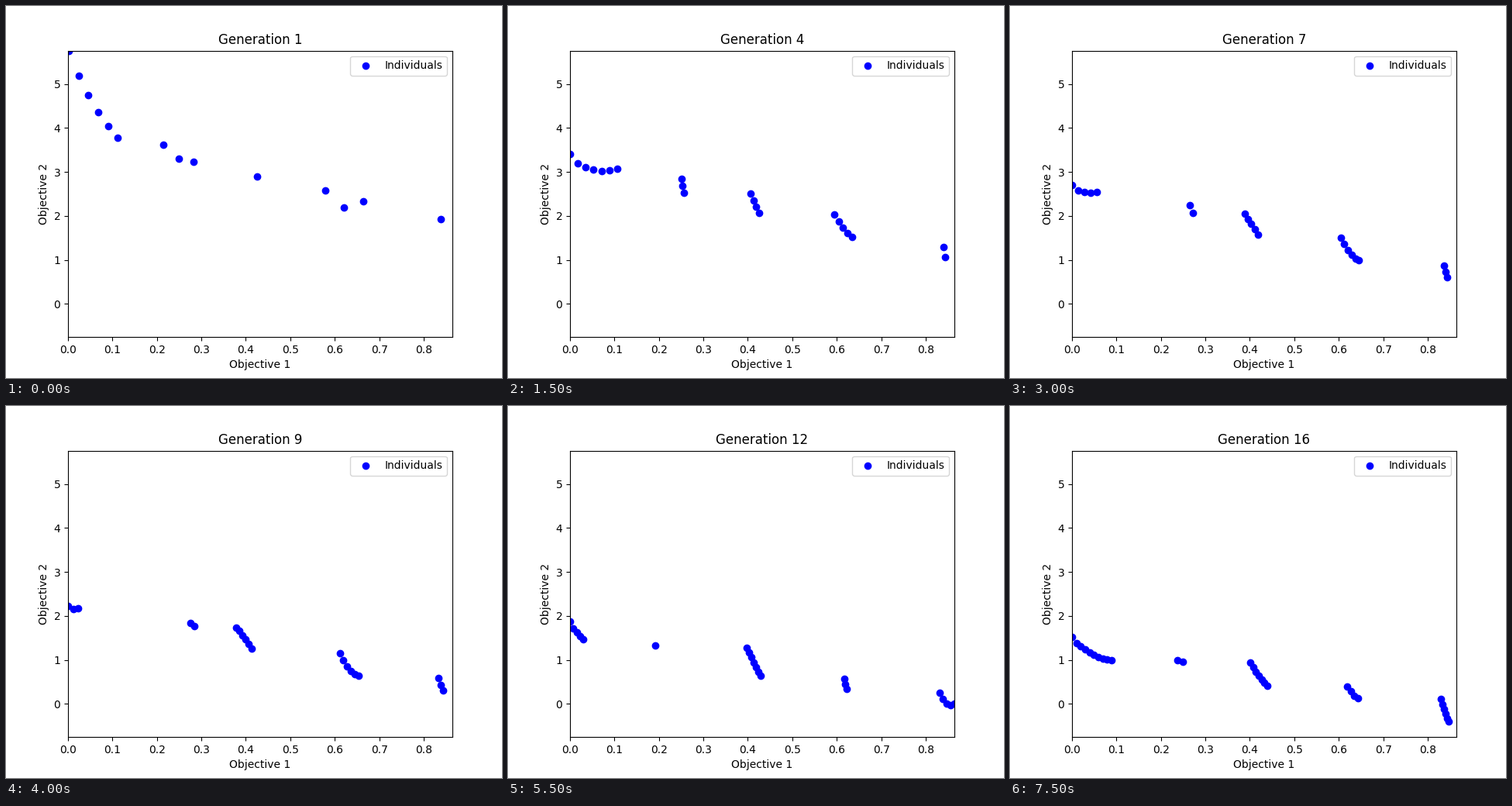
A matplotlib script that plays this animation: 640 px wide and 480 px high, repeating every 8 s.

```python
import numpy as np
import matplotlib.pyplot as plt
from matplotlib.animation import FuncAnimation

GENERATIONS = 16
XLIM, YLIM = (0, .8646), (-.755, 5.76)
PIXELS = np.array([496 / np.ptp(XLIM), 369.6 / np.ptp(YLIM)])

# Ends (x0, y0, x1, y1) of the five branches at a few generations
KEYS = {
    1: [(.002, 5.75, .112, 3.78), (.215, 3.62, .282, 3.23),
        (.425, 2.90, .425, 2.90), (.578, 2.58, .664, 2.33),
        (.838, 1.93, .838, 1.93)],
    4: [(0, 3.41, .106, 3.07), (.251, 2.84, .256, 2.53),
        (.406, 2.51, .425, 2.07), (.594, 2.03, .634, 1.52),
        (.841, 1.29, .843, 1.06)],
    9: [(0, 2.23, .023, 2.18), (.275, 1.84, .284, 1.77),
        (.378, 1.74, .413, 1.26), (.611, 1.15, .653, .64),
        (.833, .59, .843, .30)],
    12: [(0, 1.87, .03, 1.47), (.192, 1.33, .192, 1.33),
         (.397, 1.28, .429, .64), (.617, .57, .622, .34),
         (.831, .25, .864, 0)],
    16: [(0, 1.52, .089, .99), (.237, .99, .249, .96),
         (.401, .94, .439, .41), (.619, .40, .643, .13),
         (.829, .11, .847, -.40)],
}


def wave(x):
    return x * np.sin(10 * np.pi * x)


def height(x, g):
    """Second ZDT3 objective at distance g."""
    return g - np.sqrt(x * g) - wave(x)


def level(x, y):
    """Distance g for which height(x, g) is y."""
    return ((np.sqrt(x) + np.sqrt(x + 4 * (y + wave(x)))) / 2) ** 2


def branch(start, end, gap):
    """Spread individuals about gap pixels apart along the front."""
    length = np.hypot(*((end - start) * PIXELS))
    n = 1 + round(length / gap)
    x = np.linspace(start[0], end[0], n)
    g = np.linspace(level(*start), level(*end), n)
    return np.column_stack([x, height(x, g)])


def front(gen):
    """Blend the branch ends between key generations; crowding grows."""
    gens = list(KEYS)
    tracks = np.array(list(KEYS.values())).reshape(len(gens), -1).T
    ends = np.array([np.interp(gen, gens, t) for t in tracks])
    gap = 5 + 21 / gen
    return np.vstack([branch(a, b, gap) for a, b in ends.reshape(-1, 2, 2)])


fig, ax = plt.subplots(figsize=(6.4, 4.8), dpi=100)
dots = ax.scatter([], [], color="blue", label="Individuals")
ax.set(xlim=XLIM, ylim=YLIM, xlabel="Objective 1", ylabel="Objective 2")
title = ax.set_title("Generation 1")
ax.legend(loc="upper right")


def update(i):
    dots.set_offsets(front(i + 1))
    title.set_text(f"Generation {i + 1}")
    return dots, title


anim = FuncAnimation(fig, update, frames=GENERATIONS, interval=500,
                     repeat=True, repeat_delay=0, blit=False)
plt.show()
```
